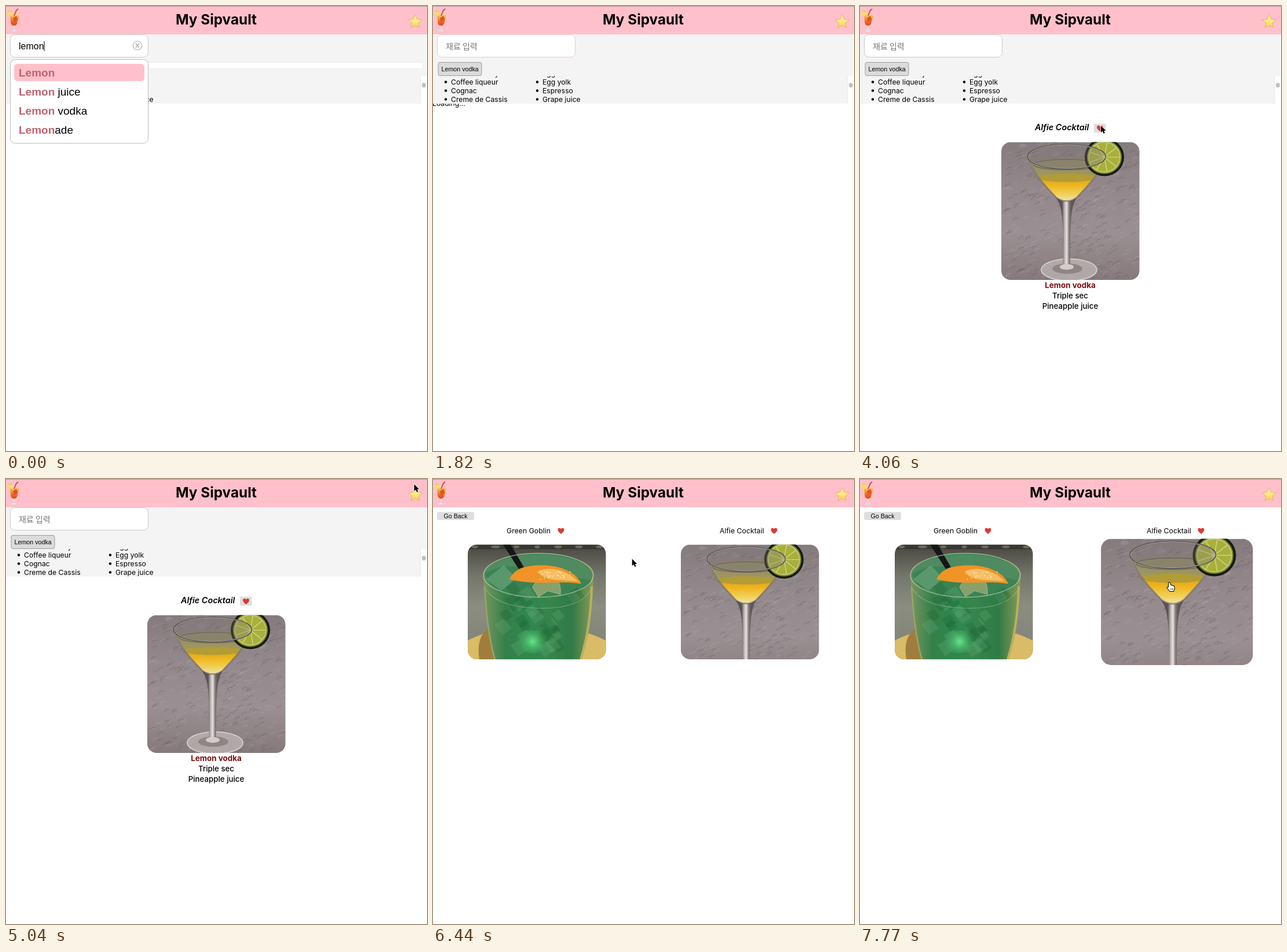
Animation, 727 px wide and 770 px high, one loop 8 s. Source, as an HTML page with a canvas:

```html
<!DOCTYPE html>
<html lang="en">
<head>
<meta charset="utf-8">
<title>My Sipvault</title>
<style>
html, body { margin: 0; height: 100%; overflow: hidden; background: #fff; }
canvas { display: block; }
</style>
</head>
<body>
<canvas id="stage" width="727" height="770"></canvas>
<script>
const ctx = document.getElementById('stage').getContext('2d');
const LOOP = 8000;
const PAGE_SWITCH = 5390;
const LIKE_TIME = 3850;
const PINK = '#ffc0cb';
const SANS = 'Inter, sans-serif';
const ARIAL = '"Liberation Sans", Arial, sans-serif';

const clamp = v => Math.min(1, Math.max(0, v));
const ease = v => 1 - (1 - clamp(v) ** 1.4) ** 3;
const within = (t, from, to) => t >= from && t < to;

// Repeatable pseudo-random number in 0..1.
const noise = n => Math.abs(Math.sin(n * 127.1) * 43758.5453) % 1;

function rect(x, y, w, h, color) {
  ctx.fillStyle = color;
  ctx.fillRect(x, y, w, h);
}

function paint(fill, stroke, width = 1) {
  if (fill) { ctx.fillStyle = fill; ctx.fill(); }
  if (stroke) { ctx.strokeStyle = stroke; ctx.lineWidth = width; ctx.stroke(); }
}

function box(x, y, w, h, r, fill, stroke) {
  ctx.beginPath();
  ctx.roundRect(x, y, w, h, r);
  paint(fill, stroke);
}

function ellipse(x, y, rx, ry, fill, stroke, width) {
  ctx.beginPath();
  ctx.ellipse(x, y, rx, ry, 0, 0, Math.PI * 2);
  paint(fill, stroke, width);
}

function shape(d, fill, stroke, width = 1) {
  const path = new Path2D(d);
  if (stroke) { ctx.strokeStyle = stroke; ctx.lineWidth = width; ctx.stroke(path); }
  if (fill) { ctx.fillStyle = fill; ctx.fill(path); }
}

function text(s, x, y, font, color = '#000', align = 'left') {
  ctx.font = font;
  ctx.fillStyle = color;
  ctx.textAlign = align;
  ctx.fillText(s, x, y);
  return ctx.measureText(s).width;
}

// Linear gradient from evenly spaced colours.
function gradient(x0, y0, x1, y1, ...colors) {
  const g = ctx.createLinearGradient(x0, y0, x1, y1);
  colors.forEach((c, i) => g.addColorStop(i / (colors.length - 1), c));
  return g;
}

function at(x, y, draw, scale = 1) {
  ctx.save();
  ctx.translate(x, y);
  ctx.scale(scale, scale);
  draw();
  ctx.restore();
}

function heart(x, y, color) {
  at(x, y, () => shape('M0 5.5C-3 3-5.5 1-5.5-1.7C-5.5-5-1.5-6 0-3C1.5-6 5.5-5 5.5-1.7C5.5 1 3 3 0 5.5Z', color));
}

function drinkIcon() {
  shape('M7 13L22 14C23 19 21 23 20 27C19 32 17 34 14 34C10 34 8 31 8 26C8 21 6 18 7 13Z',
    gradient(0, 13, 0, 34, '#f8dcb0', '#f4a536', '#ec6a24', '#d9481f'));
  shape('M12 21L18 17L20 24L14 28Z', '#e6511f');
  shape('M13 34H15L15.5 42H12.5Z', '#eadde0');
  ellipse(13.5, 43, 5.5, 1.7, '#f0e6e8', '#cfb6bb', .6);
  shape('M14 17L17.5 8L21 5', null, '#d2452f', 1.8);
  shape('M3 13C2 8 7 6 11 10L9 17Q5 17 3 13Z', '#f4e05c');
  shape('M4 10Q7 7 10 10', null, '#c8cf4e', 1.2);
}

function star(x, y) {
  ctx.beginPath();
  for (let i = 0; i < 10; i++) {
    const r = i % 2 ? 5.9 : 12.4, a = i * Math.PI / 5 - Math.PI / 2;
    ctx.lineTo(x + r * Math.cos(a), y + r * Math.sin(a));
  }
  ctx.closePath();
  ctx.lineJoin = 'round';
  paint(gradient(x, y - 12, x, y + 12, '#fff2a6', '#fde680', '#f7c948'), '#dfb46a');
}

function rug() {
  rect(0, 0, 239, 239, gradient(0, 0, 0, 239, '#857b7d', '#93888b', '#9a8f92', '#85797b'));
  for (let i = 0; i < 420; i++) {
    const x = noise(i + 1) * 239, y = noise(i + 501) * 239;
    const color = i % 2 ? 'rgba(190,180,182,.18)' : 'rgba(80,70,72,.18)';
    shape(`M${x} ${y}q3 ${-3 - 5 * noise(i + 901)} 9 -4`, null, color, 2);
  }
}

function martini() {
  rug();
  // Foot and stem
  ellipse(117, 221, 48, 19, 'rgba(190,183,182,.75)', '#d9d5d3', 1.5);
  ellipse(114, 219, 26, 9, 'rgba(120,111,110,.6)');
  shape('M94 96Q113 106 131 96C119 112 119 140 119 215L107 215C107 140 107 112 94 96Z',
    gradient(105, 0, 121, 0, '#5b5352', '#b8b1af', '#e6e3e1', '#857c7b', '#5f5755'));
  ellipse(113, 216, 12, 5, '#d2cccb');
  // Bowl
  const bowl = 'M46 25C51 49 70 70 94 95Q113 109 131 95C155 70 174 49 180 25';
  ctx.save();
  ctx.clip(new Path2D(bowl));
  rect(46, 0, 134, 110, '#888077');
  rect(46, 35, 134, 29, gradient(0, 35, 0, 64, '#918a70', '#a59b56'));
  ellipse(113, 39, 58, 9, '#8f8969', '#5d574b', 1);
  rect(46, 62, 134, 48, gradient(0, 62, 0, 103, '#dda317', '#efb721', '#f1cf55', '#f2e5ae'));
  ellipse(113, 62, 51, 7, '#b29c35');
  ctx.restore();
  shape(bowl, null, '#4f4845', 2);
  shape(bowl, null, '#cdc7c2', .9);
  // Lime wheel
  ellipse(178, 26, 32, 31, '#7d8b2a', '#171b10', 4);
  ellipse(178, 26, 27, 26, '#a8b03a', '#cfd08a', 1.5);
  for (let i = 0; i < 9; i++) {
    const a = i * Math.PI * 2 / 9;
    shape(`M178 26L${178 + 26 * Math.cos(a)} ${26 + 25 * Math.sin(a)}`, null, '#d8d89c', 1.2);
  }
  // Rim
  ellipse(113, 25, 67, 21, 'rgba(125,118,118,.3)', '#4e4847', 2.2);
  ellipse(113, 25, 66.5, 20.5, null, '#c9c4c0', .8);
}

function greenDrink() {
  rect(0, 0, 239, 199, gradient(0, 0, 0, 160, '#484640', '#74766b', '#8b8d80', '#85867a'));
  rect(0, 0, 239, 8, '#393731');
  for (let i = 0; i < 7; i++) ellipse(12 + i * 36, 4, 4 + 5 * noise(i + 1), 2.5, 'rgba(150,148,130,.55)');
  // Plate
  ellipse(119, 205, 150, 64, '#dabb66');
  shape('M35 146Q14 160 20 199H60L38 146Z', '#a17d3d');
  // Glass
  shape('M27 53C31 3 213 3 217 53C217 100 211 150 196 199L46 199C34 150 27 100 27 53Z',
    gradient(27, 0, 217, 0, '#7a9560', '#34804a', '#2f874d', '#36854c', '#2f7a46', '#8a9a55'));
  ellipse(122, 53, 93, 36, '#4f8a60');
  shape('M30 50Q60 30 122 43T213 62Q200 90 122 92T30 50Z', '#3b8353');
  // Ice
  for (let i = 0; i < 26; i++) {
    const x = 45 + noise(i + 11) * 135, y = 72 + noise(i + 61) * 105, r = 9 + 12 * noise(i + 91);
    const color = i % 2 ? 'rgba(120,185,135,.2)' : 'rgba(15,80,42,.2)';
    shape(`M${x} ${y}l${r} ${-r * .6}l${r * .8} ${r}l${-r} ${r * .7}Z`, color);
  }
  shape('M32 60L62 36L84 58L58 80Z', 'rgba(165,205,175,.28)');
  shape('M112 74Q122 52 146 56Q162 62 160 86L138 80L122 90Z', 'rgba(185,180,125,.6)', 'rgba(215,220,185,.6)');
  const glow = ctx.createRadialGradient(112, 168, 2, 112, 168, 30);
  glow.addColorStop(0, '#5fdc86');
  glow.addColorStop(1, 'rgba(50,150,80,0)');
  ellipse(112, 168, 30, 20, glow);
  // Straw and peel
  shape('M61 0L74 0L97 39L88 42Z', '#151717');
  shape('M72 60C82 40 102 35 135 36C168 38 190 52 196 68C160 61 120 72 72 60Z', '#f19327');
  shape('M120 47C140 36 172 44 190 64C166 60 136 66 120 47Z', '#f6bd62');
  for (let i = 0; i < 30; i++) {
    ellipse(125 + noise(i + 7) * 55, 46 + noise(i + 37) * 14, 1, 1, '#fde7b4');
  }
  ellipse(122, 53, 95, 38, null, 'rgba(205,220,190,.65)', 1.3);
  shape('M28 72Q45 108 122 110T216 72', null, 'rgba(190,215,180,.4)', 1.2);
  shape('M214 72C213 120 207 160 195 199', null, '#b8b060', 4);
  shape('M29 72C32 120 36 160 47 199', null, '#97a56b', 2.5);
}

function photo(x, y, w, h, draw, scale = 1) {
  at(x + w / 2, y + h / 2, () => {
    ctx.translate(-w / 2, -h / 2);
    ctx.beginPath();
    ctx.roundRect(0, 0, w, h, 16);
    ctx.clip();
    draw();
  }, scale);
}

function header() {
  rect(0, 0, 727, 49, PINK);
  rect(0, 0, 727, 1, '#b3949b');
  text('My Sipvault', 363, 31.5, `700 24.3px ${SANS}`, '#000', 'center');
  drinkIcon();
  star(706.5, 27.5);
}

function ingredientList() {
  ctx.save();
  ctx.beginPath();
  ctx.rect(0, 121, 716, 48);
  ctx.clip();
  const columns = [
    [31, 'Coffee brandy', 'Coffee liqueur', 'Cognac', 'Creme de Cassis'],
    [189, 'Egg white', 'Egg yolk', 'Espresso', 'Grape juice'],
  ];
  for (const [x, ...items] of columns) {
    items.forEach((item, i) => {
      const y = 120.5 + i * 15;
      ellipse(x - 9, y - 4, 2.2, 2.2, '#000');
      text(item, x, y, `12.2px ${SANS}`);
    });
  }
  ctx.restore();
  rect(716, 121, 11, 48, '#fff');
  rect(715, 121, 1, 48, '#e6e6e6');
  box(718, 133, 7, 8, 3.5, '#c1c1c1');
}

function dropdown(active) {
  box(7.5, 92.5, 238, 145, 8, '#fff', '#bdbdbd');
  ['', ' juice', ' vodka', 'ade'].forEach((rest, i) => {
    const y = 100 + i * 33;
    if (i === active) box(14, y, 225, 30, 6, PINK);
    const w = text('Lemon', 22, y + 21.5, `700 19px ${ARIAL}`, '#c0646f');
    text(rest, 22 + w, y + 21.5, `19px ${ARIAL}`);
  });
}

function searchBox(t, open) {
  const focused = within(t, 1680, LIKE_TIME);
  box(7.5, 49.5, 238, 39, 8, '#fff', focused ? '#ecc9d0' : '#c9c9c9');
  let width = 0;
  if (open) {
    width = text(within(t, 1120, 1260) ? 'Lemonade' : 'lemon', 22, 75, `16px ${ARIAL}`);
    ellipse(227, 68.5, 7.5, 7.5, null, '#b0b0b0', 1.2);
    shape('M224 65L230 72M230 65L224 72', null, '#a8a8a8', 1.2);
  } else {
    text('재료 입력', 22, 74.5, '14px "Noto Sans CJK KR", "Noto Sans CJK", sans-serif', '#757575');
  }
  const caretSpans = [[0, 70], [630, 910], [1120, 1260], [2100, 2310], [2730, 3230]];
  if (caretSpans.some(([a, b]) => within(t, a, b))) rect(22 + width, 61, 1, 17, '#000');
}

function recipe(t) {
  text('Alfie Cocktail', 302, 215, `italic 600 14.4px ${SANS}`);
  box(404, 203.5, 20.5, 15.5, 2, '#dedede');
  heart(414.5, 211.5, t < LIKE_TIME ? '#e9e9e9' : '#dc3b32');
  if (t >= 2100) photo(244, 235.5, 238.5, 238.5, martini);
  ctx.globalAlpha = clamp((t - 2240) / 210);
  text('Lemon vodka', 363, 488, `700 13.4px ${SANS}`, '#7d0d10', 'center');
  text('Triple sec', 363, 506, `500 13.3px ${SANS}`, '#000', 'center');
  text('Pineapple juice', 363, 524, `500 13.3px ${SANS}`, '#000', 'center');
  ctx.globalAlpha = 1;
}

function searchPage(t) {
  const open = t < 1680;
  if (within(t, 1750, 2030)) text('Loading...', -1, 173, `12.2px ${SANS}`);
  if (t >= 2030) recipe(t);
  rect(0, 49, 726, 120, '#f4f4f4');
  ingredientList();
  if (open) {
    rect(8, 97, 711, 12, '#e9e9e9');
    rect(8, 98, 711, 10, '#fff');
  } else {
    box(9, 97.5, 75, 23, 3, '#dbdbdb', '#9b9b9b');
    text('Lemon vodka', 14.5, 112.5, `10.7px ${ARIAL}`);
  }
  searchBox(t, open);
  if (open) {
    const moves = [280, 630, 910];
    dropdown(t >= 1260 ? 2 : moves.filter(m => t >= m).length);
  }
}

function favoritesPage(t) {
  box(7, 57, 64, 14, 3, '#dedede');
  text('Go Back', 18.5, 67.8, `10.7px ${ARIAL}`);
  const hoverLeft = ease((t - 6440) / 350) - ease((t - 7095) / 400);
  const hoverRight = ease((t - 7115) / 380);
  const cards = [
    [60, 'Green Goblin', greenDrink, hoverLeft],
    [428, 'Alfie Cocktail', martini, hoverRight],
  ];
  for (const [x, name, draw, hover] of cards) {
    text(name, x + 67, 93.5, `12.3px ${SANS}`);
    heart(x + 161, 89.5, '#dc3b32');
    photo(x, 113.5, 238.5, 198.5, draw, 1 + 0.1 * hover);
  }
}

// Pointer path: time, x, y
const POINTER = [
  [2800, 470, 470], [3500, 431, 212], [3570, 431, 212], [3800, 416, 207], [4200, 416, 207],
  [4480, 558, 167], [4600, 558, 167], [5000, 704, 6], [5250, 709, 24], [5600, 709, 24],
  [5670, 710, 24], [5820, 710, 24], [5950, 709, 24], [6120, 709, 24], [6380, 420, 95],
  [6500, 270, 180], [6790, 210, 195], [6980, 210, 195], [7070, 370, 190],
  [7140, 519, 181], [7350, 534, 180],
];

function pointer(t) {
  if (t < POINTER[0][0]) return;
  let i = POINTER.findIndex(p => p[0] > t);
  if (i < 0) i = POINTER.length - 1;
  const [t0, x0, y0] = POINTER[i - 1], [t1, x1, y1] = POINTER[i];
  const k = clamp((t - t0) / (t1 - t0));
  const x = x0 + (x1 - x0) * k, y = y0 + (y1 - y0) * k;
  const onStar = x > 695 && y > 14 && y < 40;
  const onCard = t > PAGE_SWITCH && y > 113 && (x < 299 || within(x, 428, 667));
  at(x, y, () => {
    ctx.lineJoin = 'round';
    if (onStar || onCard) {
      shape('M-1 0Q0-1 1.5 0L2.5 4L7 5Q9 6 9 9L7.5 14L1 14L-3 9Q-4 6-1 8Z', '#fff', '#000', 2);
      shape('M2 9V12M4.5 9V12M6.5 9V12', null, '#000', .7);
    } else {
      shape('M0 0V12L2.8 9.6L4.7 13.7L6.8 12.8L5 8.8H8.7Z', '#000', '#fff', 1.6);
    }
  });
}

function frame(now) {
  const t = now % LOOP;
  rect(0, 0, 727, 770, '#fff');
  (t < PAGE_SWITCH ? searchPage : favoritesPage)(t);
  header();
  pointer(t);
  requestAnimationFrame(frame);
}
requestAnimationFrame(frame);
</script>
</body>
</html>
```
